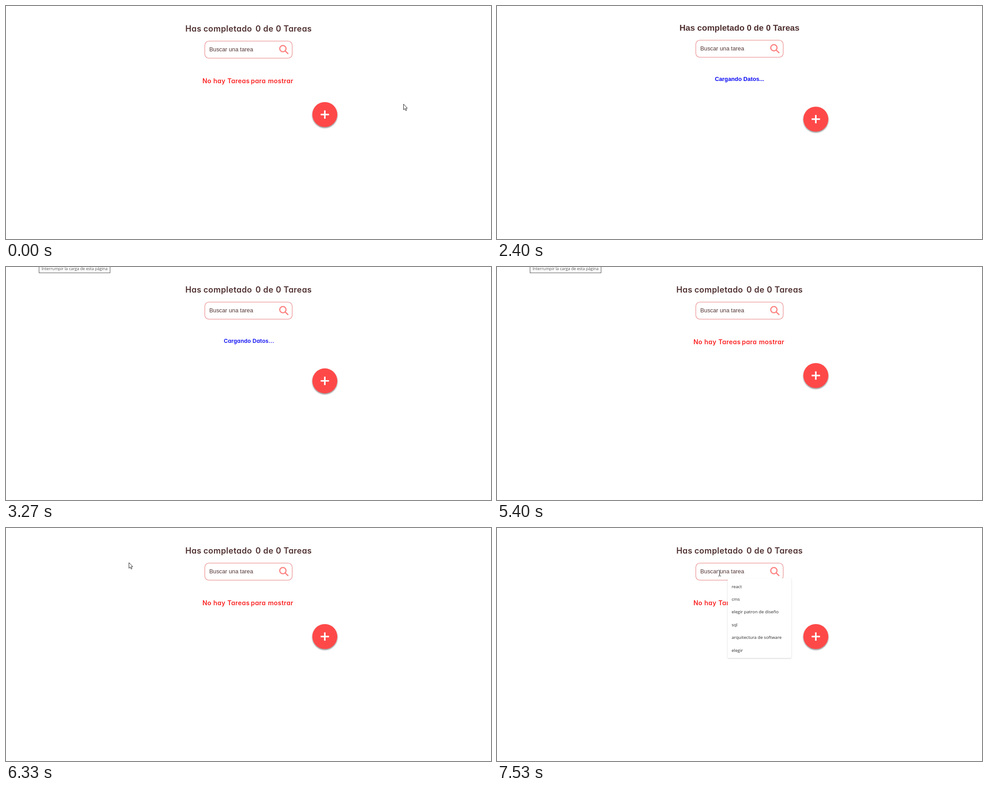
An HTML page that plays this animation: 1079x519 px, repeating every 8 s.

```html
<!DOCTYPE html>
<html lang="es">
<head>
<meta charset="utf-8">
<title>Tareas</title>
<style>
  html, body { margin: 0; width: 100%; height: 100%; overflow: hidden; background: #fff; }
  svg { display: block; width: 100vw; height: 100vh; }
  text { white-space: pre; }
  .round { font-family: Inter, Lato, sans-serif; font-weight: 600; font-feature-settings: "cv11"; }
  .plain { font-family: "Liberation Sans", Arial, sans-serif; }
  .bold { font-weight: 700; }
  .system { font-family: "Open Sans", "Noto Sans", sans-serif; }
</style>
</head>
<body>
<svg id="stage" viewBox="0 0 1079 519" xmlns="http://www.w3.org/2000/svg">
  <defs>
    <filter id="lift" x="-20%" y="-20%" width="140%" height="140%">
      <feDropShadow dx="0" dy="2" stdDeviation="1.4" flood-color="#000" flood-opacity=".5"/>
    </filter>
    <filter id="soft" x="-10%" y="-10%" width="120%" height="120%">
      <feDropShadow dx="0" dy="1" stdDeviation="1" flood-color="#000" flood-opacity=".25"/>
    </filter>
  </defs>

  <g id="webTitle" class="round" fill="#4f2f2f" font-size="18" letter-spacing=".45"></g>
  <text id="plainTitle" class="plain bold" x="539.5" y="55" text-anchor="middle" font-size="18.72" fill="#4f2f2f">Has completado 0 de 0 Tareas</text>

  <g id="search">
    <rect x="442.3" y="78.3" width="194.4" height="38" rx="9" fill="#fff" stroke="#efa5a5" stroke-width="1.6"/>
    <text class="plain" x="452.3" y="101" font-size="12.8" fill="#553636">Buscar una tarea</text>
    <g fill="none" stroke="#fd8383" stroke-width="2.6" stroke-linecap="round">
      <circle cx="616" cy="95" r="7"/>
      <path d="M621.3 100.3L627.2 106"/>
    </g>
  </g>

  <g id="empty" class="round" fill="#fb2323" font-size="14.2" letter-spacing=".35"></g>
  <g id="webLoading" class="round" fill="#0a0af5" font-size="12.2" letter-spacing=".2"></g>
  <text id="plainLoading" class="plain bold" x="539.5" y="167" text-anchor="middle" font-size="12.8" fill="#0a0af5">Cargando Datos...</text>

  <g id="add">
    <circle r="27.8" fill="#ff4a4a" filter="url(#lift)"/>
    <path d="M-9.3 0H9.3M0 -9.3V9.3" stroke="#fff" stroke-width="3.4"/>
  </g>

  <g id="tip">
    <rect x="73.5" y="-8.5" width="158" height="21.5" fill="#fff" stroke="#4a4a4a"/>
    <text class="system" x="79" y="7" font-size="9" fill="#505050">Interrumpir la carga de esta página</text>
  </g>

  <g id="menu">
    <path d="M515 112H523L530 105.3L537 112H653Q655 112 655 114V287.500Q655 289.500 653 289.500H515Q513 289.500 513 287.500V114Q513 112 515 112Z" fill="#fff" filter="url(#soft)"/>
  </g>
  <path id="caret" d="M453.5 90V104" stroke="#222"/>
  <path id="arrow" d="M.5 .5V13.2L3.400 10.500L5.400 15L7.300 14.200L5.400 9.800H9Z" fill="#fff" stroke="#222" stroke-linejoin="round"/>
  <g id="beam" fill="none">
    <path d="M-3 -6.500H3M0 -6.500V6.500M-3 6.500H3" stroke="#fff" stroke-width="2.500"/>
    <path d="M-3 -6.500H-.8M.8 -6.500H3M0 -6V6M-3 6.500H-.8M.8 6.500H3" stroke="#222" stroke-width="1.200"/>
  </g>
</svg>
<script>
  const LOOP = 8000;
  const STEP = 200 / 3;
  const el = id => document.getElementById(id);

  function addText(parent, x, y, content, className) {
    const node = document.createElementNS("http://www.w3.org/2000/svg", "text");
    node.setAttribute("x", x);
    node.setAttribute("y", y);
    if (className) node.setAttribute("class", className);
    node.textContent = content;
    parent.appendChild(node);
  }

  function addLine(id, y, line, starts) {
    line.split(" ").forEach((word, i) => addText(el(id), starts[i], y, word));
  }

  addLine("webTitle", 57, "Has completado 0 de 0 Tareas", [399, 439.2, 555, 572.3, 600.2, 617.5]);
  addLine("empty", 172, "No hay Tareas para mostrar", [437, 461.2, 492.5, 544.7, 582.7]);
  addLine("webLoading", 169, "Cargando Datos...", [484.5, 548.5]);
  ["react", "cms", "elegir patron de diseño", "sql", "arquitectura de software", "elegir"]
    .forEach((item, i) => addText(el("menu"), 522, 133.5 + i * 28.4, item, "system"));
  el("menu").setAttribute("font-size", 9.7);
  el("menu").setAttribute("fill", "#2b2b2b");

  // Pointer paths: [step, x, y]
  const leaving = [[0, 884, 218], [1, 710, 140], [2, 533, 69]];
  const entering = [[0, 49, -4], [1, 82, 12], [3, 207, 59], [5, 339, 94], [7, 426, 120],
    [8, 447, 122], [9, 464, 115], [10, 479, 108], [12, 495.3, 100.5]];

  function along(path, step) {
    const last = path[path.length - 1];
    if (step >= last[0]) return last.slice(1);
    const i = path.findIndex(p => p[0] > step);
    const [a, b] = [path[i - 1], path[i]];
    const k = (step - a[0]) / (b[0] - a[0]);
    return [a[1] + (b[1] - a[1]) * k, a[2] + (b[2] - a[2]) * k];
  }

  const show = (id, on) => el(id).setAttribute("display", on ? "inline" : "none");
  const move = (id, x, y) => el(id).setAttribute("transform", `translate(${x} ${y})`);

  function pointer(t) {
    const path = t < 200 ? leaving : t >= 6000 ? entering : null;
    const step = Math.floor(((path === entering ? t - 6000 : t) + 1) / STEP);
    const overField = path === entering && step >= 9;
    show("arrow", path && !overField);
    show("beam", overField);
    if (path) move(overField ? "beam" : "arrow", ...along(path, step));
  }

  function draw(t) {
    const loading = t >= 2400 && t < 5400;
    const fallback = t >= 2400 && t < 2470;
    show("webTitle", !fallback);
    show("plainTitle", fallback);
    show("plainLoading", fallback);
    show("webLoading", loading && !fallback);
    show("empty", !loading);
    move("search", 0, fallback ? -2 : 0);
    move("add", 709.3, fallback ? 252 : loading ? 253.6 : 241.7);
    show("tip", t >= 3270 && t < 6000);
    show("menu", t >= 7000);
    show("caret", t >= 7000 && t < 7530);
    pointer(t);
  }

  const start = performance.now();
  function tick() {
    draw((performance.now() - start) % LOOP);
    requestAnimationFrame(tick);
  }
  draw(0);
  requestAnimationFrame(tick);
</script>
</body>
</html>
```
